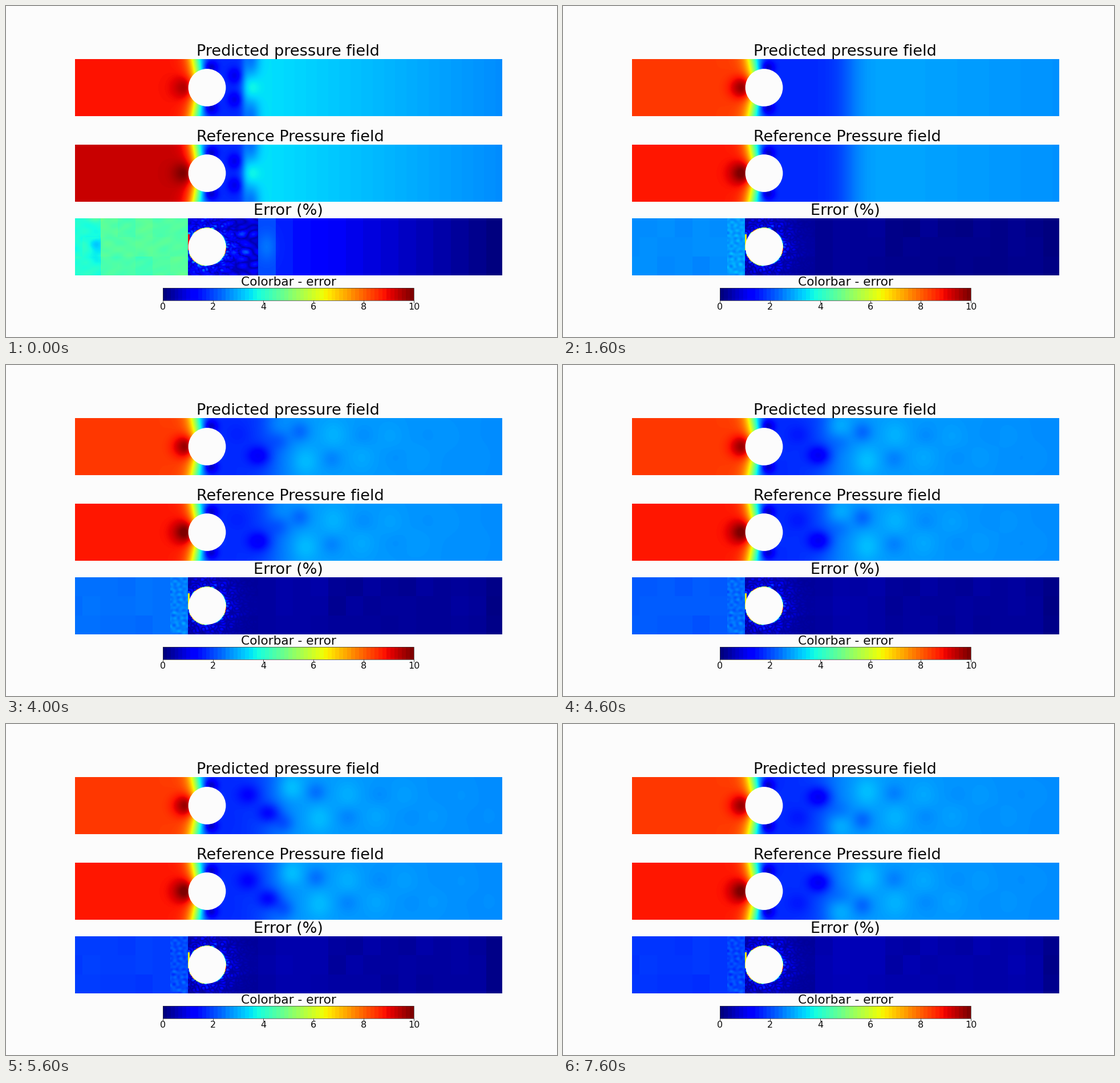
A matplotlib script that plays this animation: 966 px wide and 580 px high, repeating every 8 s.

```python
import numpy as np
import matplotlib.pyplot as plt
from matplotlib.animation import FuncAnimation
from matplotlib.patches import Circle, Rectangle

W, H, DPI = 966, 580, 100
PAPER, INK = "#fcfcfc", "#0a0a0a"
LEFT, RIGHT, TALL = 121, 870, 100
TOPS = (93, 243, 372)
CX, R = 352.5, 32.9
BLOCK = 30.75

plt.rcParams["font.family"] = "DejaVu Sans"

# pixel centres of one channel; dy is measured from its mid line
x, dy = np.meshgrid(np.arange(LEFT, RIGHT) + 0.5, np.arange(TALL) + 0.5 - TALL / 2)
dist = np.hypot(x - CX, dy)
angle = np.arctan2(dy, x - CX)
rng = np.random.default_rng(4)


def step(v, centre, width):
    return 0.5 + 0.5 * np.tanh((v - centre) / width)


def blob(x0, y0, wx, wy):
    return np.exp(-((x - x0) / wx) ** 2 - ((dy - y0) / wy) ** 2)


def mix(a, b, t):
    return a + (b - a) * t


def ripples(n, lo, hi):
    """Smooth noise of unit size made of random plane waves."""
    out = np.zeros_like(x)
    for _ in range(n):
        k, a, ph = rng.uniform(lo, hi), rng.uniform(0, np.pi), rng.uniform(0, 2 * np.pi)
        out += np.sin(k * (x * np.cos(a) + dy * np.sin(a)) + ph)
    return out / np.sqrt(n / 2)


FINE = ripples(10, 0.4, 0.8)
SOFT = ripples(8, 0.15, 0.4)

# the error is computed block by block
col = np.floor((x - 319) / BLOCK).astype(int)
row = ((dy + TALL / 2) // (TALL / 3)).astype(int)
xb = 319 + (col + 0.5) * BLOCK
PATCH = rng.normal(size=(3, 40))[row, col + 8]
RIM = 0.4 + 0.3 * np.sin(3 * angle + 1) + 0.15 * np.sin(8 * angle)

DROP = 1 - step(x, 337 - dy ** 2 / 500, 17)
STAG = blob(320, 0, 24, 20)
SUCTION = blob(358, -35, 12, 12) + blob(358, 35, 12, 12)
ARMS = 1 - np.exp(-(dy / 32) ** 2)

# wake shape: where it ends, how softly, its rise, and the slope behind it
START = np.array([416, 8, 0.185, 2e-4])
CALM = np.array([503, 30, 0.128, 7e-5])
SHED = np.array([465, 38, 0.117, 5e-5])


def settle(s):
    return 1 - max(0, 1 - s / 3) ** 2


def vortices(s):
    """Low and high pressure spots shed in turn on each side, drifting downstream."""
    out = np.zeros_like(x)
    for j in range(-2, 8):
        a = s - 9 + 6 * j
        side = 1 if j % 2 == 0 else -1
        out -= 0.1 * np.exp(-(a / 5) ** 2) * blob(450 + 6 * a, side * (15 - a), 20, 17)
        if a > 0:
            amp = 0.12 * (1 - np.exp(-a / 3)) * np.exp(-a / 8)
            out -= amp * blob(470 + 9.2 * a, side * (16 + 18 * np.exp(-a / 9)), 17, 17)
        if a > -4:
            amp = 0.055 * step(a, -1, 1.7) * np.exp(-max(a, 0) / 14)
            out += amp * blob(482 + 8.4 * a, -side * (18 + 18 * np.exp(-a / 6)), 22, 25)
    return out


def pressure(s, inlet):
    g, osc = settle(s), step(s, 7.2, 1)
    end, soft, rise, slope = mix(mix(START, CALM, g), SHED, osc)
    p = 0.165 + rise * step(x, end, soft) - slope * np.maximum(x - end - 20, 0)
    p += (inlet - 0.165) * DROP + (0.11 + 0.07 * g) * STAG - 0.14 * SUCTION
    early = 0.075 * (blob(401, -21, 12, 13) + blob(401, 21, 12, 13))
    early += 0.12 * blob(430, 0, 15, 300) * ARMS - 0.02 * blob(430, 0, 14, 22)
    return p + osc * vortices(s) - (1 - g) * early


def error(s):
    g = settle(s)
    # upstream
    first = np.where(x < 166, 0.39, 0.45) + 0.008 * PATCH + 0.006 * SOFT
    first += 0.06 * blob(158, -52, 14, 9) - 0.06 * blob(160, 0, 14, 24) * (x < 166)
    last = 0.265 - 0.088 * step(s, 8.7, 2) + 0.003 * PATCH + (x > 288) * (0.015 + 0.012 * FINE)
    up = mix(first, last, g)
    # downstream
    first = 0.16 * np.clip(1 - (xb - 442) / 420, 0, 1) + 0.06 * np.exp((450 - xb) / 25)
    first += 0.04 * blob(457, 0, 16, 25)
    last = 0.012 + 0.0022 * max(s - 3, 0) + 0.014 * np.exp(-((xb - 510) / 50) ** 2)
    last = last * np.where(xb > 835, 0.4, 1) + 0.004 * PATCH
    down = mix(first, last, g)
    # around the body
    near = np.exp(-np.maximum(dist - R, 0) / 14)
    first = 0.04 + 0.05 * np.abs(SOFT) + 0.1 * near * np.abs(FINE)
    last = 0.025 + 0.004 * PATCH + 0.1 * near * np.abs(FINE)
    body = mix(first, last, g)
    e = np.where(x < 319, up, np.where(x < 442, body, down))
    e = np.where(dist < R + 0.9, RIM, e)
    # the hot spot where the flow meets the body
    front = (abs(x - 320.5) < 1.5) & (abs(dy + 8) < 14)
    return np.where(front, 0.9 - 0.25 * g, e)


def fields(s):
    g = settle(s)
    return pressure(s, 0.89 - 0.042 * g), pressure(s, 0.937 - 0.052 * g), error(s)


fig = plt.figure(figsize=(W / DPI, H / DPI), dpi=DPI, facecolor=PAPER)
ax = fig.add_axes([0, 0, 1, 1])
ax.axis("off")


def label(px, py, text, size, ha="center"):
    ax.text(px, py, text, fontsize=size * 72 / DPI, ha=ha, va="baseline", color=INK, zorder=5)


def strip(data, left, right, top, bottom):
    return ax.imshow(data, cmap="jet", vmin=0, vmax=1, interpolation="nearest",
                     extent=(left, right, bottom, top))


STATES = [fields(s) for s in range(16)]
images = []
for top, data in zip(TOPS, STATES[0]):
    images.append(strip(data, LEFT, RIGHT, top, top + TALL))
    ax.add_patch(Circle((CX, top + TALL / 2), R, fc=PAPER, ec="none", zorder=3))

label(334.3, 87, "Predicted pressure field", 27.1, "left")
label(334.3, 237, "Reference Pressure field", 27.1, "left")
label(495, 366.5, "Error (%)", 27.1)
label(495, 489.5, "Colorbar - error", 21.7)

strip(np.linspace(0, 1, 64)[None], 275, 715, 494, 516)
ax.add_patch(Rectangle((275, 494), 440, 22, fill=False, ec="#333333", lw=0.5))
for i in range(6):
    tx = 275 + 88 * i
    ax.plot([tx, tx], [516, 519.5], color="#333333", lw=0.6)
    label(tx, 532.5, str(2 * i), 16)

ax.set_xlim(0, W)
ax.set_ylim(H, 0)
ax.set_aspect("auto")


def update(k):
    # each second holds two pictures: 600 ms, then 400 ms
    s = 2 * (k // 5) + (k % 5 >= 3)
    for im, data in zip(images, STATES[s]):
        im.set_data(data)
    return images


anim = FuncAnimation(fig, update, frames=40, interval=200, repeat=True, repeat_delay=0, blit=False)
plt.show()
```
